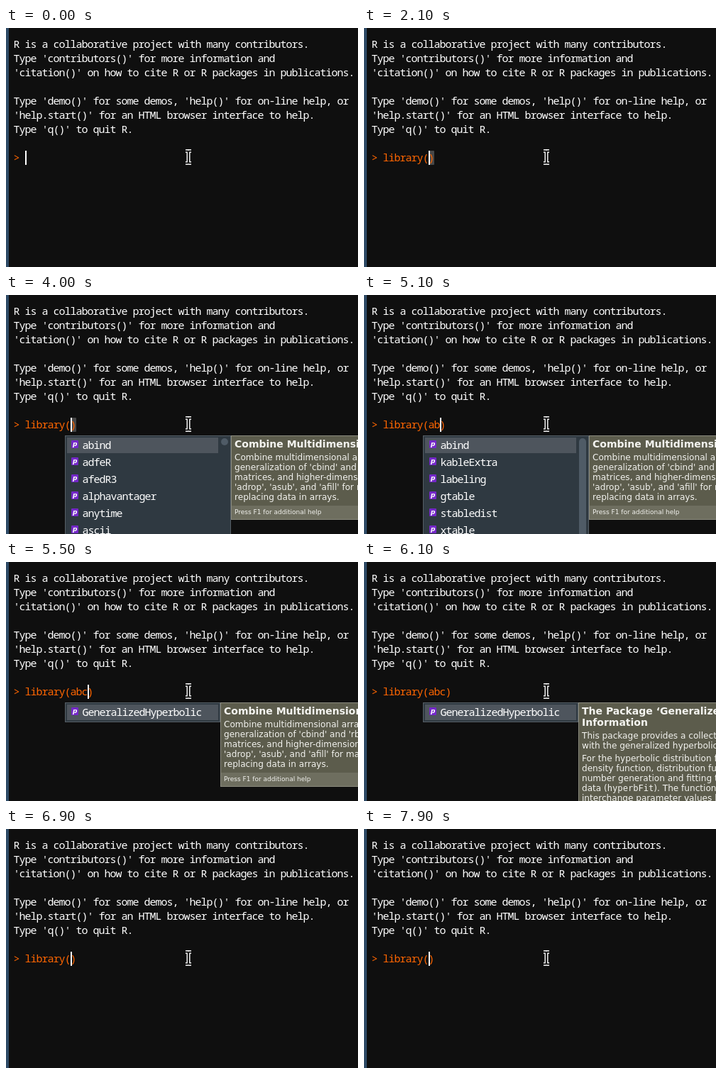
Write an HTML page that moves like this. It is 496 by 337 pixels and loops after 8000 ms.

```html
<!DOCTYPE html>
<html lang="en">
<head>
<meta charset="utf-8">
<title>Package name completion</title>
<style>
  html, body { margin: 0; width: 100%; height: 100%; overflow: hidden; background: #0f0f0f; }
  svg { display: block; width: 496px; height: 337px; }
  text { white-space: pre; }
  .mono { font: 500 15px "Noto Sans Mono", monospace; letter-spacing: -1px; fill: #fff; }
  #input { fill: #f60; }
  .title { font: bold 14px "DejaVu Sans", sans-serif; fill: #f4f4f0; }
  .body { font: 12.1px "DejaVu Sans", sans-serif; fill: #f2f2ee; }
  .body tspan { font-family: "DejaVu Sans Mono", monospace; }
  .foot { font: 9px "DejaVu Sans", sans-serif; fill: #f2f2ee; }
  .letter { font: italic bold 9px "DejaVu Sans", sans-serif; fill: #fff; }
  .panel { fill: #2f3941; stroke: #565f66; }
  .help { fill: #5c5c4c; stroke: #8b8b7e; }
</style>
</head>
<body>
<svg viewBox="0 0 496 337">
  <rect width="496" height="337" fill="#0f0f0f"/>
  <rect width="4" height="337" fill="#2e4a66"/>
  <g id="banner"></g>
  <rect id="bracket" x="91" y="173" width="8" height="20" rx="1" fill="#474747"/>
  <text id="input" class="mono" x="10.5" y="188"></text>
  <rect id="caret" y="173" width="2" height="20" fill="#fff"/>
  <g fill="none" stroke-linejoin="round">
    <path id="beam" d="M253 173.5h3l1 1l1-1h3M257 174v16M253 190.5h3l1-1l1 1h3" stroke="#fff" stroke-width="5"/>
    <use href="#beam" style="display:none"/>
    <path d="M253 173.5h3l1 1l1-1h3M257 174v16M253 190.5h3l1-1l1 1h3" stroke="#0f0f0f" stroke-width="2.2"/>
  </g>
  <g id="list"></g>
  <g id="help"></g>
</svg>
<script>
const LOOP = 8000;
const $ = id => document.getElementById(id);
const text = (cls, x, y, content) => `<text class="${cls}" x="${x}" y="${y}">${content}</text>`;
const rect = (x, y, w, h, attrs) => `<rect x="${x}" y="${y}" width="${w}" height="${h}" ${attrs}/>`;

$("banner").innerHTML = [
  "R is a collaborative project with many contributors.",
  "Type 'contributors()' for more information and",
  "'citation()' on how to cite R or R packages in publications.",
  "",
  "Type 'demo()' for some demos, 'help()' for on-line help, or",
  "'help.start()' for an HTML browser interface to help.",
  "Type 'q()' to quit R."
].map((line, i) => text("mono", 10.5, 28 + 20 * i, line)).join("");

const lists = {
  all: { names: ["abind", "adfeR", "afedR3", "alphavantager", "anytime", "ascii"], thumb: 10 },
  ab: { names: ["abind", "kableExtra", "labeling", "gtable", "stabledist", "xtable"], thumb: 150 },
  abc: { names: ["GeneralizedHyperbolic"], thumb: 0 }
};

function listMarkup({ names, thumb }) {
  const [width, height] = thumb ? [234, 150] : [219, 28];
  const rows = names.map((name, i) => {
    const y = 212 + 24 * i;
    return rect(92, y - 7, 10, 11, 'rx="1" fill="#7428c8"') +
      text("letter", 94, y + 1, "p") + text("mono", 107.5, y + 5, name);
  });
  return rect(83.5, 198.5, width - 1, height - 1, 'class="panel"') +
    rect(86, 201, 213, 22, 'fill="#4e555d"') +
    (thumb ? rect(303, 202, 10, thumb, 'rx="5" fill="#4f5b66"') : "") +
    rows.join("");
}

const helps = {
  abind:
    rect(.5, 198.5, 260, 118, 'class="help"') +
    rect(1, 297, 260, 19, 'fill="#6e6e5f"') +
    text("title", 5, 215, "Combine Multidimensional Arrays") +
    ["Combine multidimensional arrays. This is a",
     "generalization of 'cbind' and 'rbind'. Takes",
     "matrices, and higher-dimensional arrays. Also",
     "'adrop', 'asub', and 'afill' for manipulating,",
     "replacing data in arrays."
    ].map((line, i) => text("body", 5, 233 + 14 * i, line)).join("") +
    text("foot", 5, 309, "Press F1 for additional help"),
  hyperbolic:
    rect(.5, 198.5, 260, 180, 'class="help"') +
    text("title", 5, 215, "The Package ‘GeneralizedHyperbolic’:") +
    text("title", 5, 231, "Information") +
    [[249, "This package provides a collection of functions"],
     [263, "with the generalized hyperbolic distribution"],
     [281, "For the hyperbolic distribution functions"],
     [295, "density function, distribution function,"],
     [309, "number generation and fitting to"],
     [323, "data (<tspan>hyperbFit</tspan>). The function"],
     [337, "interchange parameter values between"]
    ].map(([y, line]) => text("body", 5, y, line)).join("")
};

// Each step lists only what changes; "|" marks the caret position.
const steps = [
  [0, { line: "|", caret: true, bracket: false, list: "", help: "", helpX: 317 }],
  [500, { caret: false }],
  [600, { line: "l|", caret: true }],
  [800, { line: "li|" }],
  [900, { line: "lib|" }],
  [1200, { line: "libr|" }],
  [1300, { line: "libra|" }],
  [1400, { line: "librar|" }],
  [1500, { line: "library|" }],
  [2000, { line: "library(|)" }],
  [2100, { bracket: true }],
  [2600, { caret: false, bracket: false, list: "all" }],
  [3000, { caret: true, bracket: true }],
  [3200, { help: "abind" }],
  [3600, { caret: false, bracket: false }],
  [4000, { caret: true, bracket: true }],
  [4600, { line: "library(a|)", bracket: false }],
  [5100, { line: "library(ab|)", list: "ab" }],
  [5500, { line: "library(abc|)", list: "abc", helpX: 302 }],
  [5700, { help: "hyperbolic" }],
  [6100, { caret: false }],
  [6500, { line: "library(ab|)", caret: true, list: "ab", help: "abind", helpX: 317 }],
  [6800, { line: "library(a|)", list: "all" }],
  [6900, { line: "library(|)", list: "", help: "" }],
  [7500, { caret: false }],
  [7900, { caret: true }]
];

function show({ line, caret, bracket, list, help, helpX }) {
  $("input").textContent = "> " + line.replace("|", "");
  $("caret").setAttribute("x", 27 + 8 * line.indexOf("|"));
  $("caret").style.display = caret ? "" : "none";
  $("bracket").style.display = bracket ? "" : "none";
  $("list").innerHTML = list && listMarkup(lists[list]);
  $("help").innerHTML = help && helps[help];
  $("help").setAttribute("transform", `translate(${helpX})`);
}

let shown = -1;
function frame() {
  const now = performance.now() % LOOP;
  const count = steps.filter(([start]) => start <= now).length;
  if (count !== shown) {
    shown = count;
    show(Object.assign({}, ...steps.slice(0, count).map(([, change]) => change)));
  }
  requestAnimationFrame(frame);
}
frame();
</script>
</body>
</html>
```
